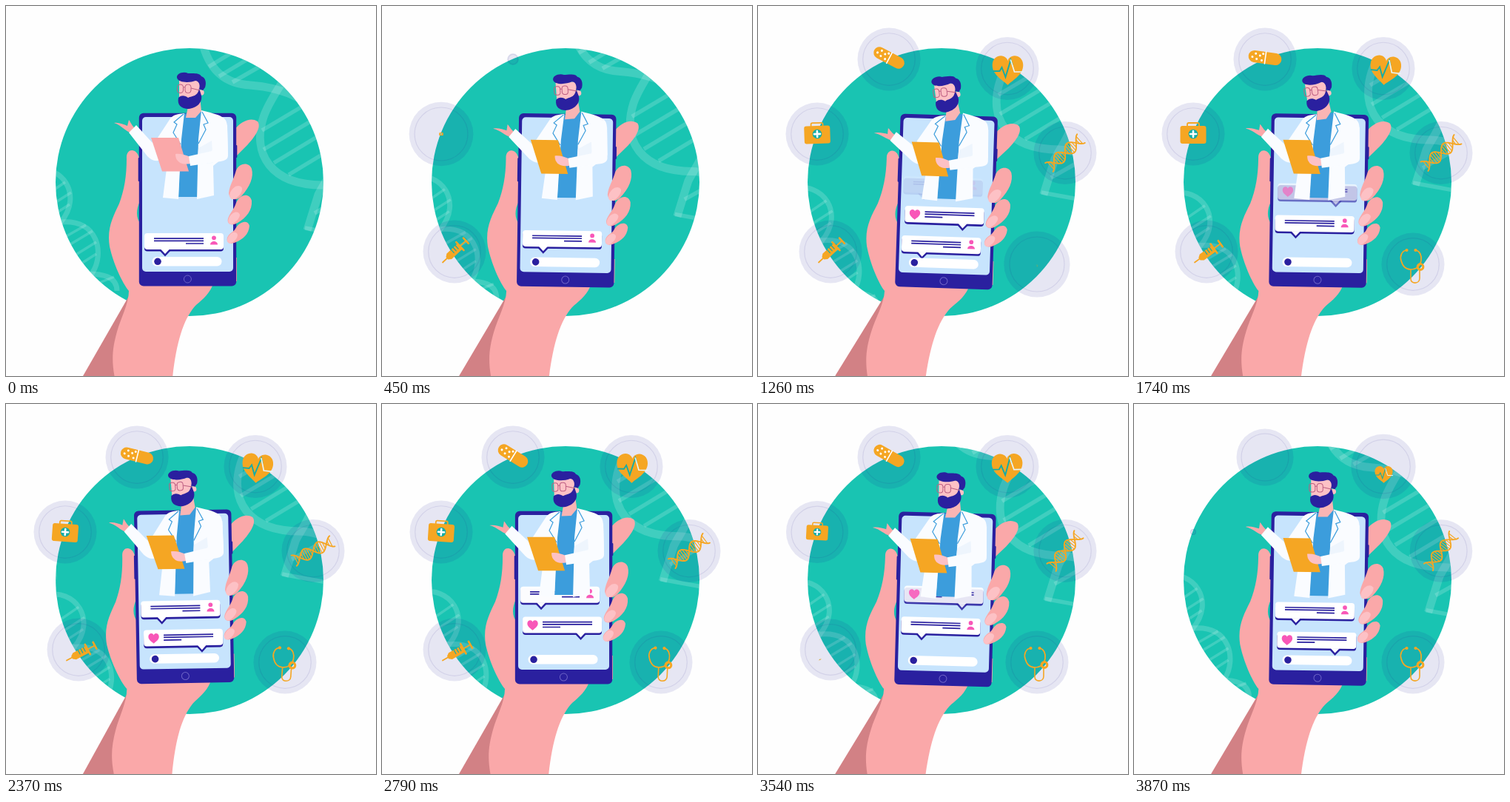
Recreate the animation shown at these times as an HTML page with a canvas. Size 500 by 500 pixels, loop 3.9 s.

```html
<!DOCTYPE html>
<html lang="en">
<head>
<meta charset="utf-8">
<title>Online doctor</title>
<style>
html, body { margin: 0; width: 100%; height: 100%; overflow: hidden; background: #fefefe; }
canvas { display: block; }
</style>
</head>
<body>
<canvas id="stage" width="500" height="500"></canvas>
<script>
const c = document.getElementById('stage').getContext('2d');
const LOOP = 3900, RAD = Math.PI / 180;
const NAVY = '#2a209f', GREEN = '#19c4b2', TEAL = '#14aca6', ORANGE = '#f5a623';
const SKIN = '#faa8a9', PALE = '#fdc1c5', SHADE = '#d28185', COAT = '#fafcff';
const BLUE = '#3c9ddc', PINK = '#f857b8', SCREEN = '#c7e4fd';

// Smooth monotone curve through pairs: time, value, time, value...
function track(t, k) {
  const n = k.length / 2, T = i => k[2 * i], V = i => k[2 * i + 1];
  if (t <= T(0)) return V(0);
  if (t >= T(n - 1)) return V(n - 1);
  let i = 0;
  while (t > T(i + 1)) i++;
  const sec = j => (V(j + 1) - V(j)) / (T(j + 1) - T(j));
  const slope = j => {
    if (j === 0) return sec(0);
    if (j === n - 1) return sec(n - 2);
    const a = sec(j - 1), b = sec(j);
    return a * b <= 0 ? 0 : 2 * a * b / (a + b);
  };
  const h = T(i + 1) - T(i), u = (t - T(i)) / h, w = 1 - u;
  return w * w * (1 + 2 * u) * V(i) + u * u * (3 - 2 * u) * V(i + 1)
    + h * u * w * (w * slope(i) - u * slope(i + 1));
}

function fill(d, color) { c.fillStyle = color; c.fill(new Path2D(d)); }
function line(d, color, width) {
  c.strokeStyle = color; c.lineWidth = width; c.stroke(new Path2D(d));
}
function box(x, y, w, h, r, color) {
  c.beginPath(); c.roundRect(x, y, w, h, r); c.fillStyle = color; c.fill();
}
function disc(x, y, r, color) {
  c.beginPath(); c.arc(x, y, r, 0, 7); c.fillStyle = color; c.fill();
}
function ring(x, y, r, color, width) {
  c.beginPath(); c.arc(x, y, r, 0, 7);
  c.strokeStyle = color; c.lineWidth = width; c.stroke();
}
function group(draw) { c.save(); draw(); c.restore(); }
function spin(x, y, a) { c.translate(x, y); c.rotate(a); c.translate(-x, -y); }

function heart(x, y, s, color) {
  group(() => {
    c.translate(x, y); c.scale(s, s);
    fill('M0,.95C-.35,.6-1,.3-1,-.35C-1,-.75-.7,-.95-.45,-.95C-.2,-.95 0,-.75 0,-.6C0,-.75 .2,-.95 .45,-.95C.7,-.95 1,-.75 1,-.35C1,.3 .35,.6 0,.95Z', color);
  });
}

function backdrop(t) {
  const k = track(t, [0, 0, 870, 35, 1260, 48, 1740, 61, 2370, 70, 3210, 50, 3900, 20]);
  const strand = 'rgba(255,255,255,.17)';
  disc(248, 238, 181, GREEN);
  group(() => {
    c.beginPath(); c.arc(248, 238, 181, 0, 7); c.clip();
    c.lineCap = 'butt'; c.lineJoin = 'round';
    group(() => {
      c.translate(-.44 * k, -k);
      line('M262,30C268,80 290,105 330,107C380,111 430,130 445,190C450,215 432,235 422,255L407,303', strand, 11);
      line('M395,50C390,90 360,115 348,150C332,200 358,242 428,242C450,243 470,250 480,262', strand, 11);
      line('M274,82L340,42M288,95L350,58M306,103L360,72M346,168L410,130M348,194L440,139M362,212L445,162M382,228L445,190M417,280L470,250M404,300L470,312', strand, 5.5);
    });
    group(() => {
      c.translate(.26 * k, .52 * k);
      line('M-5,160C45,155 60,200 35,222C5,255 40,285 74,292C125,287 133,335 117,360C108,375 115,400 130,420', strand, 7);
      line('M35,222C75,212 105,255 74,292C60,315 85,350 110,362C130,362 150,365 150,385', strand, 7);
      line('M45,262L80,238M52,275L88,252M60,285L86,268M80,312L108,296M82,325L117,304M88,340L122,319M97,351L122,335M116,378L146,366', strand, 3.5);
    });
  });
}

const ICONS = [
  { // syringe, anchored at the needle tip
    x: 98, y: 332, ax: -16, ay: 14.5, turn: [1260, -43, 1740, -36, 2370, -28, 3210, -32],
    draw() {
      line('M0,0H10M32,0H42', ORANGE, 1.8);
      fill('M8,-2L12,-5H32V5H12L8,2Z', ORANGE);
      line('M32,-7.5V7.5M43,-5V5', ORANGE, 2.6);
      line('M20,-5V1M24,-5V1M28,-5V1', TEAL, 1.2);
    }
  },
  { // medical case
    x: 80, y: 173, ax: 0, ay: 0, turn: [870, 0, 1260, -2, 1740, 0, 2370, 4, 3210, 3],
    draw() {
      line('M-8,-10V-13Q-8,-15-6,-15H6Q8,-15 8,-13V-10', ORANGE, 1.8);
      box(-17.5, -11, 35, 24, 3, ORANGE);
      disc(0, 0, 6.3, TEAL);
      line('M0,-4V4M-4,0H4', '#fff', 2.6);
    }
  },
  { // plaster
    x: 177, y: 72, ax: 0, ay: -2, turn: [850, 38, 1260, 28, 1740, 8, 1950, 5, 2370, 14, 3050, 38, 3210, 37, 3600, 28],
    draw() {
      box(-22.5, -8, 45, 16, 8, ORANGE);
      line('M.5,-8V8', '#fff', 1.6);
      for (const [x, y] of [[-17, 1], [-13, -4], [-11, 3], [-7, -2], [-4, 4], [-3, -5]]) disc(x, y, 1.5, '#fff');
    }
  },
  { // heartbeat, anchored at the lower point
    x: 337, y: 84.5, ax: .5, ay: 22.5, turn: [900, 0, 1260, 0, 1740, 6, 2370, 6, 3210, -3, 3870, 0],
    draw() {
      heart(0, -20, 20.8, ORANGE);
      c.lineJoin = 'miter';
      line('M-19,-19H-11L-8,-24L-3,-11L4,-34L6,-28', TEAL, 1.9);
      line('M4,-34L9,-18H21', '#e9f4f4', 1.7);
    }
  },
  { // helix
    x: 415, y: 198.5, ax: 0, ay: 0, turn: [1260, -42, 1740, -39, 2370, -27, 3210, -48, 3870, -52],
    draw() {
      const y = x => 8 * Math.sin(Math.PI * x / 20);
      c.strokeStyle = ORANGE; c.lineWidth = 1.9;
      for (const s of [1, -1]) {
        c.beginPath();
        for (let x = -29; x <= 29; x++) c.lineTo(x, s * y(x));
        c.stroke();
      }
      c.lineWidth = 1.2; c.beginPath();
      for (let x = -26; x <= 26; x += 3.25) { c.moveTo(x, -y(x)); c.lineTo(x, y(x)); }
      c.stroke();
    }
  },
  { // stethoscope
    x: 377, y: 349, ax: 0, ay: 2, turn: [1740, 0, 2370, 4, 3210, 0],
    draw() {
      line('M-9,-21C-15,-20-18,-13-16,-7C-14,1-9,5-3,5C5,5 10,0 11,-7C12,-14 9,-20 4,-21', ORANGE, 1.7);
      line('M-3,5V18C-3,25 9,25 9,17V4', ORANGE, 1.6);
      disc(-8.5, -21, 2.1, ORANGE); disc(3.5, -21, 2.1, ORANGE);
      ring(10, 1.5, 3.9, ORANGE, 3);
    }
  }
];

function bubble(t, icon, i) {
  const a = t - 207 * i, b = t - 3280 - 130 * i;
  const r = b > 0
    ? track(b, [0, 42.5, 175, 42, 215, 44.5, 240, 42.3, 330, 38.5, 370, 25, 460, 4, 485, 0])
    : track(a, [0, 0, 40, 9, 80, 24, 125, 37, 170, 47, 218, 45, 255, 42.5]);
  if (r <= 0) return;
  const s = b > 0
    ? track(b, [0, 1, 70, .96, 200, .58, 270, 0])
    : track(a, [210, 0, 250, .2, 350, 1.1, 430, 1]);
  disc(icon.x, icon.y, r, 'rgba(25,25,145,.1)');
  ring(icon.x, icon.y, r * .83, 'rgba(40,35,140,.1)', 1.2);
  if (s <= 0) return;
  group(() => {
    c.translate(icon.x + icon.ax, icon.y + icon.ay);
    c.rotate(track(t, icon.turn) * RAD);
    c.scale(s, s);
    icon.draw();
  });
}

function arm() {
  fill('M166,392L104,500L98,512H152L170,440Z', SHADE);
  fill('M163,206C162,192 177,191 180,206L181,264C175,276 176,288 182,294V340H312V372L279,378C273,392 262,399 255,406C238,426 229,460 224,512H149C142,482 143,465 150,440C155,422 166,402 166,385C157,374 145,348 140,325C136,300 145,284 153,267C160,248 163,230 163,206Z', SKIN);
  fill('M308,168C318,155 331,150 340,156C346,164 335,178 326,188L308,206Z', SKIN);
}

function fingers() {
  fill('M311,222C316,211 329,211 332,220C335,231 330,244 318,257C311,264 302,262 301,253C302,242 308,234 311,222Z', SKIN);
  fill('M303,252C307,243 316,240 319,246C320,251 314,259 308,261C303,262 301,258 303,252Z', PALE);
  fill('M311,266C316,254 329,252 332,263C333,276 325,286 313,293C305,298 298,295 300,287C303,279 308,275 311,266Z', SKIN);
  fill('M302,285C306,278 314,276 316,282C316,287 310,293 305,295C300,295 299,290 302,285Z', PALE);
  fill('M310,301C315,291 327,288 329,297C328,309 320,315 311,319C303,323 297,320 299,313C302,306 307,306 310,301Z', SKIN);
  fill('M301,311C305,305 311,304 313,309C313,314 308,319 303,321C298,320 298,315 301,311Z', PALE);
}

function phone() {
  box(178.7, 205, 4, 32, 1, NAVY);
  box(308, 188, 4.3, 17, 1, NAVY);
  box(179.8, 144.8, 131.4, 233.7, 6, NAVY);
  box(184, 150, 123, 209, 5, SCREEN);
  ring(245.4, 369, 5, '#6d63c6', 1);
}

function message(y, heartKind, pop) {
  const x = heartKind ? 190 : 187, tail = heartKind ? 78.5 : 28;
  const alpha = Math.max(0, Math.min(1, (y - 227) / 20));
  if (!alpha || pop <= 0) return;
  group(() => {
    c.globalAlpha = alpha;
    c.translate(x + tail, y + 22); c.scale(pop, pop); c.translate(-tail, -22);
    box(0, 2.6, 107, 22, 4, NAVY);
    fill(`M${tail - 8},23h16l-8,8.5z`, NAVY);
    box(0, 0, 107, 22, 4, '#fff');
    fill(`M${tail - 6},21.5h12l-6,6.5z`, '#fff');
    if (heartKind) {
      heart(13.5, 11.5, 7.2, PINK);
      line('M27,7.2H94M27,10.3H94M27,14H51', NAVY, 1.7);
    } else {
      line('M13,7.2H80M13,10.3H80M56,14H80', NAVY, 1.7);
      disc(94, 6.3, 2.9, PINK);
      fill('M89,15.5C89,9.5 99,9.5 99,15.5Z', PINK);
    }
  });
}

// Scroll positions of the chat, the two kinds taking turns
const CHAT = [
  [-300, 307, 0, 307, 400, 304, 870, 262, 1260, 229, 1500, 215],
  [620, 307, 870, 297, 1260, 269, 1740, 239, 2100, 224],
  [1150, 311, 1260, 309, 1740, 282, 2370, 267, 3210, 222],
  [2120, 309, 2370, 306, 3210, 262, 3870, 227],
  [3030, 308, 3210, 303, 3870, 267],
  [3700, 310, 3870, 307]
];

function chat(t) {
  CHAT.forEach((keys, i) => {
    const start = keys[0];
    if (t > start) message(track(t, keys), i % 2 === 1, track(t - start, [0, 0, 100, 1]));
  });
  box(197.5, 339, 94, 12.5, 6.2, '#fff');
  disc(205, 345.3, 4.8, NAVY);
}

function head() {
  fill('M246,136L262,122L264,142L256,151H243Z', '#f9b5b4');
  fill('M234,101H262V122C262,134 236,137 234,124Z', PALE);
  disc(264, 117, 3.7, PALE);
  fill('M233,124C237,120 242,121 246,124C252,121 259,123 261,111L264,121C266,132 255,139 245,139C237,138 231,134 233,124Z', NAVY);
  fill('M231,97C230,91 240,88 246,91C252,91 262,90 264,95C270,97 271,104 269,110L266,114L261,112C263,106 260,101 256,101C248,104 233,104 231,97Z', NAVY);
  c.strokeStyle = '#bd5f83'; c.lineWidth = 1;
  c.beginPath(); c.roundRect(231.5, 106, 8, 11.5, 3.5); c.roundRect(242, 106, 8, 11.5, 3.5); c.stroke();
  line('M239.5,110Q241,109 242,110M250,111L262,114', '#bd5f83', 1);
}

function doctor(t) {
  const lean = track(t, [0, 0, 870, -8.3, 1260, -9.3, 1740, -8.8, 2370, -3.5, 3210, -1, 3870, -1.3]);
  const drop = track(t, [0, 0, 870, 13, 1260, 14, 1740, 7.5, 2370, 2, 3210, 10, 3870, 8]);
  const board = t < 210 ? SKIN : ORANGE;

  fill('M237,146L268,142L262,258H233L235,200Z', BLUE);
  group(() => { spin(255, 165, lean * RAD); head(); });
  fill('M241,145C232,146 226,147 222,152L203,181L218,212L212,259L233,261L237,180Z', COAT);
  fill('M264,141C275,144 286,146 292,150C298,153 299,158 299,167L300,200L280,216L281,256L258,261L260,180Z', COAT);
  fill('M260,192L278,182L280,212L258,214Z', '#eef5fd');
  c.lineJoin = 'miter';
  line('M240,146L227,157L231,160L226,171L236,187M265,143L273,158L267,160L270,167L260,186', BLUE, 1.2);

  group(() => {
    c.translate(0, drop * .3);
    group(() => {
      spin(200, 170, -drop * .0132);
      fill('M146,158C152,157 159,160 164,162L166,154C168,156 169,160 173,164L168,171C161,169 156,161 146,158Z', SKIN);
      fill('M176,161L197,184L219,192L208,208C202,211 196,208 191,203L166,171Z', COAT);
    });
    fill('M196,178H233L247,223.5L211,223.5Z', board);
  });
  group(() => {
    c.translate(0, drop * .2);
    fill('M229,200C235,199 242,201 249,204V213C243,214 238,214 234,211C230,208 229,204 229,200Z', PALE);
    fill('M247,203L278,196L292,168L299,160L300,202C300,207 296,209 290,210L249,216Z', COAT);
  });
}

function draw(t) {
  c.fillStyle = '#fefefe';
  c.fillRect(0, 0, 500, 500);
  backdrop(t);
  c.lineCap = 'round';
  ICONS.forEach((icon, i) => bubble(t, icon, i));
  c.lineCap = 'butt';
  const tilt = track(t, [0, 0, 870, 1.45, 1220, 1.88, 1260, 1.87, 1740, .87, 2370, -1, 3210, 1.3, 3500, 1.55, 3870, .87]);
  group(() => {
    spin(165, 540, tilt * RAD);
    arm();
    phone();
    chat(t);
    doctor(t);
    fingers();
  });
}

const begin = performance.now();
function frame() {
  const t = (performance.now() - begin) % LOOP;
  draw(Math.floor(t / 30) * 30);
  requestAnimationFrame(frame);
}
frame();
</script>
</body>
</html>
```
